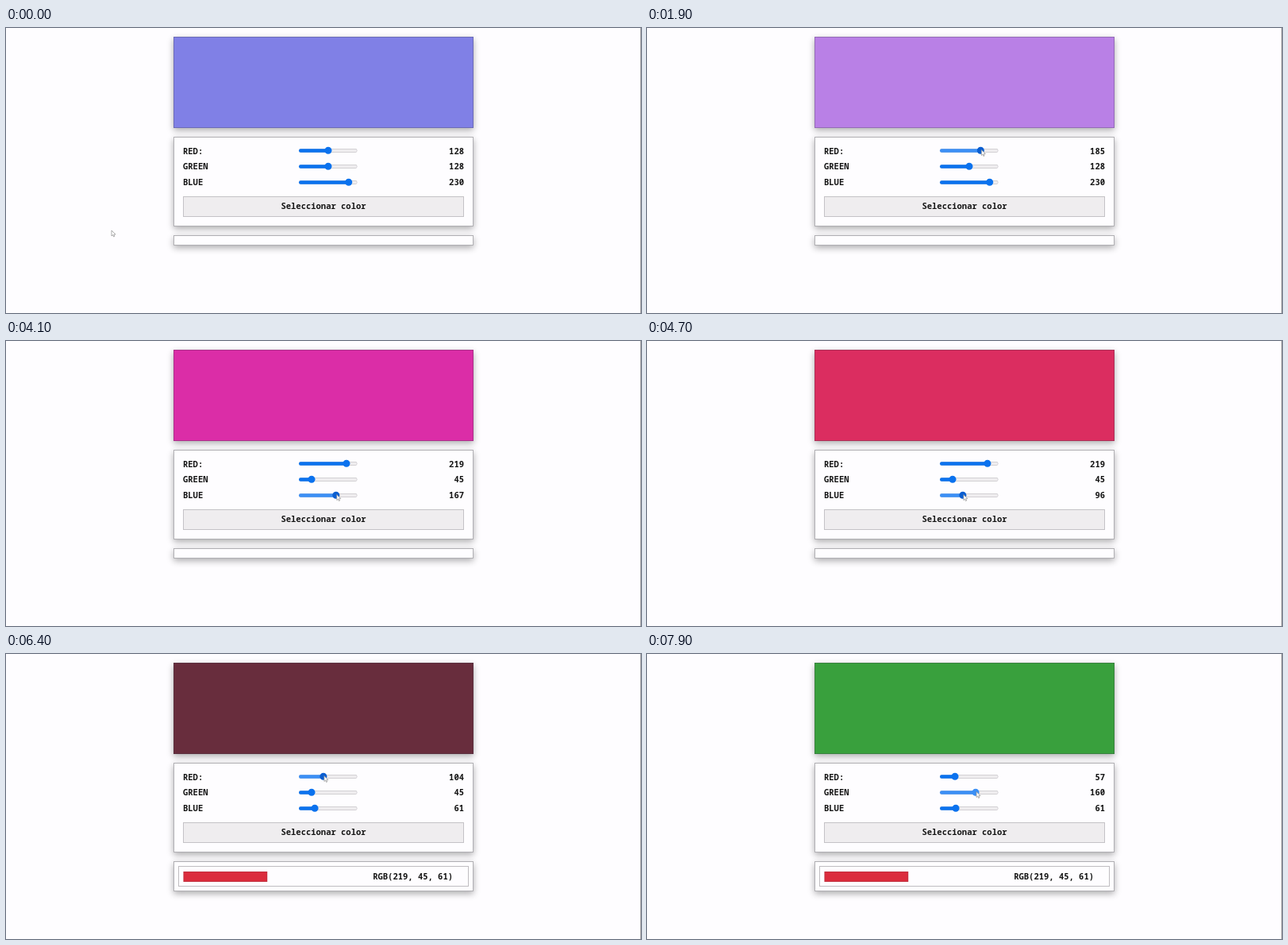
Animation, 800 px wide and 359 px high, one loop 8 s. Source, as an HTML page with a canvas:

```html
<!DOCTYPE html>
<html lang="es">
<head>
<meta charset="utf-8">
<title>Selector de color</title>
<style>
  html, body { margin: 0; width: 100%; height: 100%; overflow: hidden; background: #fefdff; }
  canvas { display: block; }
</style>
</head>
<body>
<canvas id="stage" width="800" height="359"></canvas>
<script>
const ctx = document.getElementById('stage').getContext('2d');
const LOOP = 8000, STEP = 100, MAX_GLIDE = 700, SAVED_AT = 5500;
const PAPER = '#fefdff', BLUE = '#0b72ee', LIGHT_BLUE = '#3b8ff5', DARK_BLUE = '#0b5ed0';

const labels = ['RED:', 'GREEN', 'BLUE'];
const RED_ROW = 0, GREEN_ROW = 1, BLUE_ROW = 2;
const startValues = [128, 128, 230];
const rest = { x: 133, y: 255, until: 500 };

// The pointer drags a slider to a value or visits the button; it glides in between.
const moves = [
  { row: RED_ROW, start: 1400, end: 2200, to: 219 },
  { row: GREEN_ROW, start: 2500, end: 3100, to: 45 },
  { row: BLUE_ROW, start: 3570, end: 5000, to: 61 },
  { visit: { x: 404, y: 224 }, start: 5400, end: 5600 },
  { row: RED_ROW, start: 6100, end: 6750, to: 57, power: 2 },
  { row: GREEN_ROW, start: 7200, end: 7900, to: 160 }
];

const clamp = p => Math.min(1, Math.max(0, p));
const mix = (a, b, p) => a + (b - a) * p;
const smooth = p => p * p * (3 - 2 * p);
const easeOut = (p, power = 1) => 1 - (1 - p) ** power;

const rowY = row => 154.5 + 20 * row;
const thumbX = value => 373.6 + value / 255 * 64.4;
const grip = (row, value) => ({ x: thumbX(value) + 1, y: rowY(row) - 1 });

function stateAt(t) {
  const values = [...startValues];
  let pointer = rest, freeAt = rest.until, active = -1;
  for (const move of moves) {
    const { row, visit, start, end } = move;
    const goal = visit || grip(row, values[row]);
    const p = smooth(clamp((t - freeAt) / Math.min(MAX_GLIDE, start - freeAt)));
    pointer = { x: mix(pointer.x, goal.x, p), y: mix(pointer.y, goal.y, p) };
    if (!visit && t >= start - STEP && t <= end) active = row;
    if (t < start) break;
    if (!visit) {
      const done = easeOut(clamp((t - start) / (end - start)), move.power);
      values[row] = Math.round(mix(values[row], move.to, done));
      pointer = grip(row, values[row]);
    }
    if (t < end) break;
    freeAt = end;
  }
  return { values, pointer, active };
}

function rect(x, y, w, h, fill, stroke, shadow) {
  ctx.save();
  if (shadow) {
    ctx.shadowColor = 'rgba(0,0,0,.32)';
    ctx.shadowBlur = 8;
    ctx.shadowOffsetY = 3;
  }
  ctx.fillStyle = fill;
  ctx.fillRect(x, y, w, h);
  ctx.restore();
  ctx.strokeStyle = stroke;
  ctx.lineWidth = 1;
  ctx.strokeRect(x + .5, y + .5, w - 1, h - 1);
}

function text(str, x, y, align = 'left', weight = 600) {
  ctx.font = `${weight} 10.5px "Noto Sans Mono", monospace`;
  ctx.textAlign = align;
  ctx.fillStyle = '#151515';
  ctx.fillText(str, x, y);
}

function pill(x, y, w, h, fill) {
  ctx.beginPath();
  ctx.roundRect(x, y, w, h, h / 2);
  ctx.fillStyle = fill;
  ctx.fill();
}

function slider(row, value, active) {
  const x = thumbX(value), y = rowY(row);
  pill(369, y - 2.4, 73.5, 4.8, '#c9c7cb');
  pill(369.6, y - 1.8, 72.3, 3.6, '#efedef');
  pill(369, y - 2.2, x - 369, 4.4, active ? LIGHT_BLUE : BLUE);
  ctx.beginPath();
  ctx.arc(x, y - .2, 4.5, 0, Math.PI * 2);
  ctx.fillStyle = !active ? BLUE : row === GREEN_ROW ? LIGHT_BLUE : DARK_BLUE;
  ctx.fill();
}

function drawPointer({ x, y }) {
  const outline = [[0, 0], [0, 7], [1.6, 5.6], [2.7, 8], [3.8, 7.5], [2.8, 5.2], [5, 5]];
  ctx.beginPath();
  outline.forEach(([dx, dy]) => ctx.lineTo(x + dx, y + dy));
  ctx.closePath();
  ctx.fillStyle = '#fff';
  ctx.fill();
  ctx.strokeStyle = '#8c8c8c';
  ctx.lineWidth = .7;
  ctx.stroke();
}

function draw(t) {
  const { values, pointer, active } = stateAt(t);

  ctx.fillStyle = PAPER;
  ctx.fillRect(0, 0, 800, 359);
  ctx.fillStyle = '#a5a4a8';
  ctx.fillRect(799, 0, 1, 359);

  rect(211, 11, 378, 115, `rgb(${values})`, 'rgba(60,60,70,.3)', true);
  rect(211, 137, 378, 113, PAPER, '#b0afb3', true);

  labels.forEach((label, row) => {
    const base = 159 + 19.3 * row;
    text(label, 223, base);
    slider(row, values[row], row === active);
    text(values[row], 577, base, 'right');
  });

  const hover = Math.abs(pointer.x - 400) < 177 && Math.abs(pointer.y - 225) < 13;
  rect(223, 212, 354, 26, hover ? '#e3e1e3' : '#efedef', '#c4c2c6');
  text('Seleccionar color', 400, 228, 'center', 700);

  const saved = t >= SAVED_AT;
  rect(211, 261, 378, saved ? 38 : 13, PAPER, '#b0afb3', true);
  if (saved) {
    const color = [219, 45, 61];
    rect(217, 267, 366, 26, PAPER, '#bfbdc1');
    rect(223.5, 274, 105.7, 13, `rgb(${color})`, 'rgba(90,60,65,.2)');
    text(`RGB(${color.join(', ')})`, 563, 284, 'right');
  }

  drawPointer(pointer);
}

function frame(now) {
  draw(Math.floor(now % LOOP / STEP) * STEP);
  requestAnimationFrame(frame);
}
draw(0);
requestAnimationFrame(frame);
</script>
</body>
</html>
```
